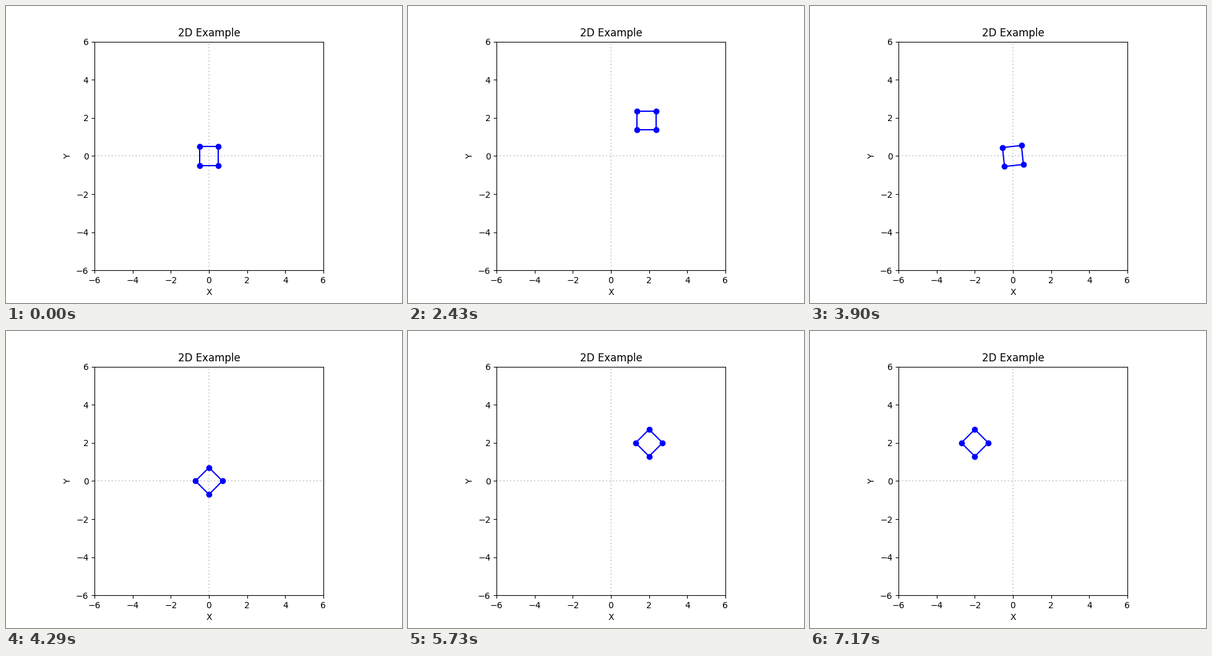
Animation of 640x480 px, one loop 8 s. Source, as a matplotlib script:

```python
import numpy as np
import matplotlib.pyplot as plt
from matplotlib.animation import FuncAnimation

LOOP, INTERVAL = 8000, 20               # ms
FIRST, PERIOD, TICK = 990, 1440, 30     # first move, move spacing, step (ms)
STEPS = 15                              # steps per move

# centre of the square before the first move and after each move
CENTRES = [0, 2 + 2j, 0, 0, 2 + 2j, -2 + 2j]
SPIN_MOVE = 2                           # this move turns in place


def phase(t):
    """Number of moves made by time t, with a linear fraction for the current one."""
    move, since = divmod(t - FIRST, PERIOD)
    return move + min(since // TICK + 1, STEPS) / STEPS


def corners(t):
    p = phase(t)
    centre = np.interp(p, range(len(CENTRES)), CENTRES)
    turn = np.pi / 4 * np.clip(p - SPIN_MOVE, 0, 1)
    angles = turn + np.pi / 2 * np.arange(5) - 3 * np.pi / 4
    z = centre + np.sqrt(0.5) * np.exp(1j * angles)
    return z.real, z.imag


fig, ax = plt.subplots(figsize=(6.4, 4.8), dpi=100)
ax.set_aspect("equal")
ax.set(xlim=(-6, 6), ylim=(-6, 6), xlabel="X", ylabel="Y", title="2D Example")
ax.axhline(0, color="lightgray", linestyle=":")
ax.axvline(0, color="lightgray", linestyle=":")
# one marker per corner, none on the closing point
outline, = ax.plot(*corners(0), "bo-", markevery=slice(4))


def update(i):
    # sample each frame at its middle
    outline.set_data(*corners(i * INTERVAL + INTERVAL // 2))
    return outline,


anim = FuncAnimation(fig, update, frames=LOOP // INTERVAL, interval=INTERVAL,
                     repeat=True, repeat_delay=0)
plt.show()
```
